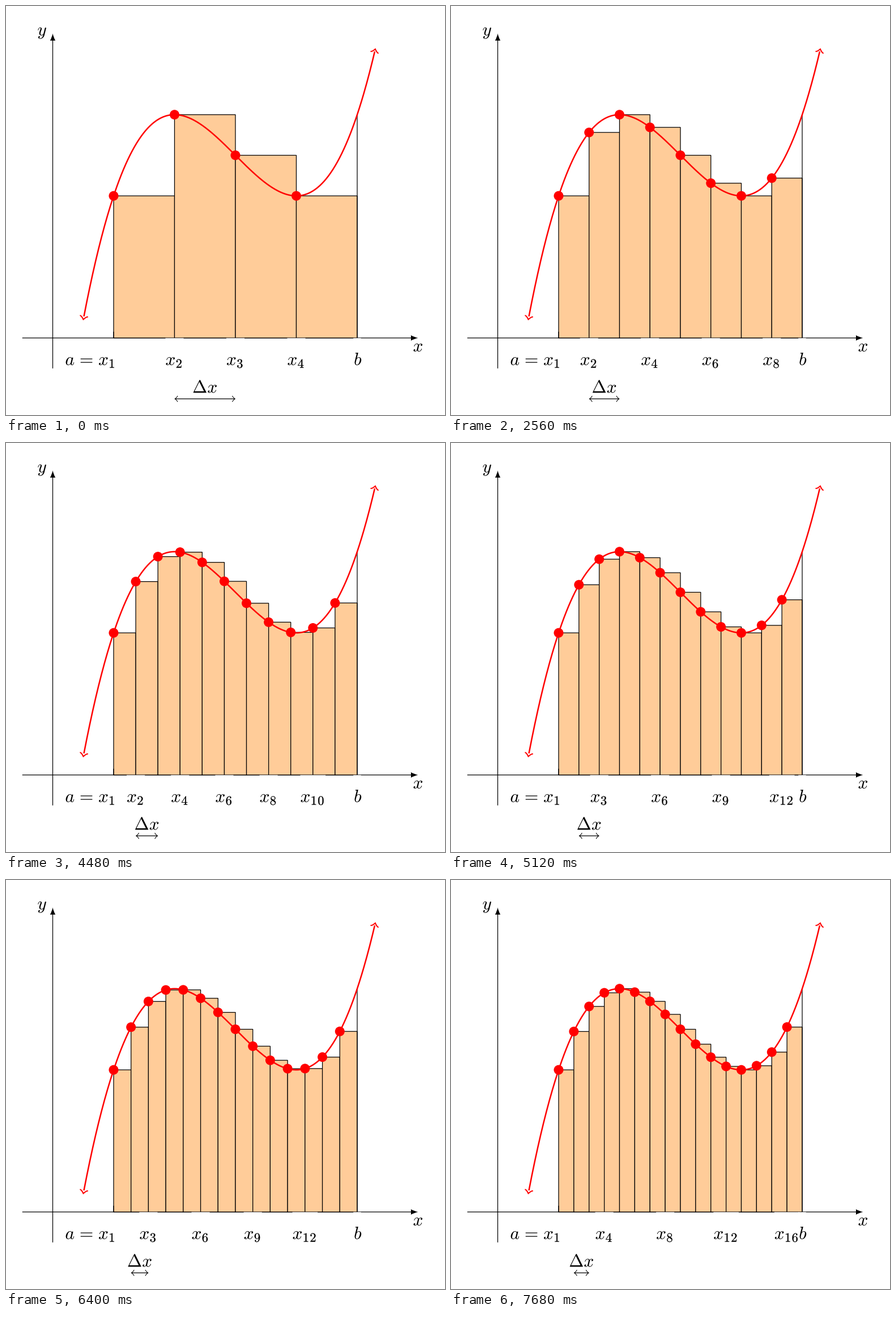
A matplotlib script that plays this animation: 775 px wide and 722 px high, repeating every 8 s.

```python
import math

import matplotlib.pyplot as plt
import numpy as np
from matplotlib.animation import FuncAnimation
from matplotlib.patches import Circle, PathPatch, Rectangle
from matplotlib.path import Path
from matplotlib.textpath import TextPath
from matplotlib.transforms import Affine2D

W, H, DPI = 775, 722, 100
UNIT, OX, OY = 53.75, 82.5, 586.0   # pixels per unit, origin of the graph
PT = 3.149                          # pixels per typographic point
EM = 10 * PT
THIN, THICK = 0.4 * PT, 0.8 * PT
A, B = 2, 10
DOT_RADIUS = 8.5
RED, FILL = "#ff0000", "#ffcc99"
LABEL_Y = 634

plt.rcParams["mathtext.fontset"] = "cm"
fig = plt.figure(figsize=(W / DPI, H / DPI), dpi=DPI, facecolor="white")
ax = fig.add_axes([0, 0, 1, 1])
ax.set_xlim(0, W)
ax.set_ylim(H, 0)
ax.axis("off")

glyphs = {}


def px(x):
    return OX + UNIT * x


def py(y):
    return OY - UNIT * y


def f(x):
    u = (x - 6) / 2
    return 6 + 2 / 3 * (u ** 3 - 3 * u)


def points(width):
    return width * 72 / DPI


def line(xs, ys, color="black", width=THIN, z=1):
    return ax.plot(xs, ys, color=color, lw=points(width), zorder=z,
                   solid_capstyle="butt", snap=False)[0]


def patch(p):
    p.set_snap(False)
    return ax.add_patch(p)


def head(x, y, angle, verts, codes, **style):
    turn = Affine2D().rotate(angle).translate(x, y)
    return patch(PathPatch(Path(verts, codes).transformed(turn), **style))


def open_head(x, y, angle, width=THIN, color="black", z=4):
    """Curved two-stroke arrowhead whose tip touches (x, y)."""
    a = 0.28 * PT + 0.3 * width
    back = 0.21 * PT + 0.625 * width
    verts = np.array([(-3, 4), (-2.75, 2.5), (0, 0.25), (0.75, 0),
                      (0, -0.25), (-2.75, -2.5), (-3, -4)]) * a - (back, 0)
    return head(x, y, angle, verts, [1] + [4] * 6, fill=False, ec=color,
                lw=points(0.8 * width), capstyle="round", joinstyle="round", zorder=z)


def solid_head(x, y, angle):
    a = 0.28 * PT + 0.3 * THIN
    verts = np.array([(0, 0), (-2.667, 0.5), (-7, 2), (-10, 3.75),
                      (-10, -3.75), (-7, -2), (-2.667, -0.5), (0, 0)]) * a
    head(x, y, angle, verts, [1, 4, 4, 4, 2, 4, 4, 4], fc="black", lw=0, zorder=1)


def glyph(symbol, x, y, scale=1.0, stroke=0):
    if symbol not in glyphs:
        glyphs[symbol] = TextPath((0, 0), f"${symbol}$", size=EM)
    place = Affine2D().scale(scale, -scale).translate(x, y)
    return patch(PathPatch(glyphs[symbol].transformed(place), fc="black",
                           ec="black", lw=points(stroke), zorder=7))


def indexed_x(index, left, y):
    digits = str(index)
    parts = [glyph("x", left, y)]
    for i, d in enumerate(digits):
        parts.append(glyph(d, left + (0.578 + 0.398 * i) * EM, y + 0.15 * EM, 0.72, 0.3))
    return parts


def cover(left, width):
    """White label background that trims the lower edge of the axis."""
    return patch(Rectangle((left, OY + 0.3), width, 8, fc="white", lw=0, zorder=6))


def draw_static():
    tip = 5
    line([px(-1), px(12) - tip], [OY, OY])
    line([OX, OX], [py(-1), py(10) + tip])
    solid_head(px(12), OY, 0)
    solid_head(OX, py(10), -math.pi / 2)
    glyph("x", px(12) - 0.286 * EM, 610)
    glyph("y", 55.4, 51.9)

    line([px(A)] * 2, [OY, OY - 11], z=3)
    line([px(B)] * 2, [OY, py(f(B))], z=3)

    x = np.linspace(1, 10.6, 400)
    cx, cy = px(x), py(f(x))
    line(cx[1:-1], cy[1:-1], RED, THICK, 4)
    for end, before in ((0, 3), (-1, -4)):
        angle = math.atan2(cy[end] - cy[before], cx[end] - cx[before])
        open_head(cx[end], cy[end], angle, THICK, RED)

    left = 104.4
    glyph("a", left, LABEL_Y)
    glyph("=", left + 0.631 * EM, LABEL_Y)
    indexed_x(1, left + 1.862 * EM, LABEL_Y)
    cover(px(B) - 6.8, 13.5)
    glyph("b", px(B) - 5.9, LABEL_Y)


def draw_sum(n):
    """Left-endpoint sum with n rectangles, its dots and its labels."""
    parts = []
    dx = (B - A) / n
    for i in range(n):
        x = A + i * dx
        parts.append(patch(Rectangle((px(x), py(f(x))), dx * UNIT, UNIT * f(x),
                                     fc=FILL, ec="black", lw=points(THIN), zorder=2)))
        parts.append(patch(Circle((px(x), py(f(x))), DOT_RADIUS, fc=RED, lw=0, zorder=5)))

    step = n // 4
    for k in range(max(step, 2), n + 1, step):
        width = (0.622 + 0.398 * len(str(k))) * EM
        left = px(A + (k - 1) * dx) - width / 2
        parts.append(cover(left, width))
        parts += indexed_x(k, left, LABEL_Y)

    x2, x3, y = px(A + dx), px(A + 2 * dx), py(-2)
    parts.append(line([x2 + 1, x3 - 1], [y, y]))
    parts.append(open_head(x2, y, math.pi))
    parts.append(open_head(x3, y, 0))
    left = (x2 + x3) / 2 - 0.7025 * EM
    parts.append(glyph(r"\Delta", left, 682.8))
    parts.append(glyph("x", left + 0.833 * EM, 682.8))
    return parts


current = []


def clear():
    while current:
        current.pop().remove()
    return []


def update(frame):
    clear()
    current.extend(draw_sum(4 + frame // 2))
    return current


draw_static()
anim = FuncAnimation(fig, update, frames=25, init_func=clear, interval=320,
                     repeat=True, repeat_delay=0, blit=False)
plt.show()
```
